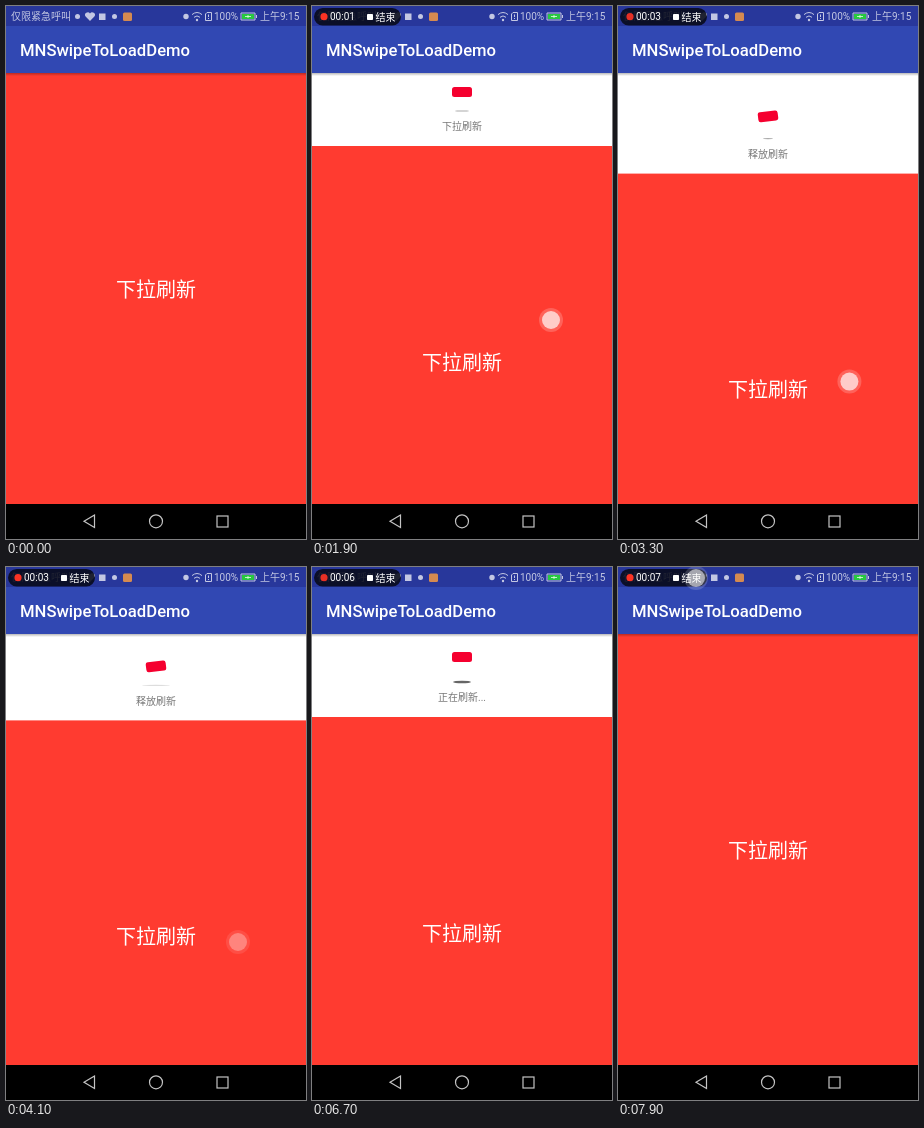
Recreate the animation shown at these times as an HTML page. Size 300 px wide and 533 px high, loop 8 s.

```html
<!DOCTYPE html>
<html lang="zh-CN">
<head>
<meta charset="utf-8">
<style>
  html, body { margin: 0; height: 100%; overflow: hidden; background: #000; }
  svg { display: block; width: 300px; height: 533px; }
  text { font-family: Roboto, "Noto Sans CJK SC", "Noto Sans CJK JP", sans-serif; font-size: 10px; fill: #fff; }
</style>
</head>
<body>
<svg viewBox="0 0 300 533">
  <defs>
    <linearGradient id="fade" x2="0" y2="1">
      <stop stop-opacity=".28"/><stop offset="1" stop-opacity="0"/>
    </linearGradient>
  </defs>
  <rect y="67" width="300" height="431" fill="#fff"/>

  <!-- Everything that slides with the pull; y = 67 is the panel's top edge -->
  <g id="sheet">
    <ellipse id="shadow" cx="150" cy="32"/>
    <rect id="toy" x="-10" y="-5" width="20" height="10" rx="2.5" fill="#f5002f"/>
    <text id="label" x="150" y="51.3" text-anchor="middle" style="fill:#777"></text>
    <rect y="67" width="300" height="431" fill="#ff3b30"/>
    <text x="150" y="290.5" text-anchor="middle" style="font-size:20px;font-weight:300">下拉刷新</text>
  </g>

  <rect y="67" width="300" height="3" fill="url(#fade)"/>
  <rect width="300" height="67" fill="#3148b3"/>
  <rect width="300" height="20" fill="#28379b"/>
  <text x="14" y="50" style="font-size:16.67px;font-weight:500">MNSwipeToLoadDemo</text>

  <g opacity=".72">
    <text x="5" y="14">仅限紧急呼叫</text>
    <text x="208" y="13.6">100%</text>
    <text x="254" y="14">上午9:15</text>
    <g fill="#fff">
      <circle cx="71.5" cy="10.5" r="2.5"/>
      <path d="M84 15L79.6 10.6A2.5 2.5 0 0 1 84 7.4A2.5 2.5 0 0 1 88.4 10.6Z"/>
      <rect x="93" y="7.5" width="6.5" height="6.5"/>
      <circle cx="108.5" cy="10.5" r="2.5"/>
      <circle cx="180" cy="10.5" r="2.7"/>
      <circle cx="191" cy="14" r="1.2"/>
    </g>
    <g fill="none" stroke="#fff">
      <path d="M186 8.6Q191 4.4 196 8.6M188 11.3Q191 8.6 194 11.3"/>
      <path d="M201 6.5H205.5V14.5H199.5V8ZM202.5 8.5V11M202.5 12V13"/>
      <path d="M235 7H249V14H235ZM250.5 9V12"/>
    </g>
  </g>
  <rect x="117" y="6.5" width="9" height="8.5" rx="1.5" fill="#d58a50"/>
  <rect x="236" y="8" width="12" height="5" fill="#27c840"/>
  <path d="M239 10.5H245M242 9V12" stroke="#e8ffe8" stroke-width=".8"/>

  <g id="pill">
    <rect x="2" y="2" width="87" height="17.5" rx="8.75" fill="#080a18" opacity=".87"/>
    <circle id="dot" cx="12" cy="10.7" r="3.6" fill="#ff3425"/>
    <text id="clock" x="18" y="14.3"></text>
    <rect x="55" y="8" width="6" height="6" rx=".8" fill="#fff"/>
    <text x="63.5" y="14.5">结束</text>
  </g>

  <rect y="498" width="300" height="35"/>
  <g fill="none" stroke="#c4c4c4" stroke-width="1.2">
    <path d="M88.5 509V521.5L78 515.2Z"/>
    <circle cx="150" cy="515.3" r="6.5"/>
    <rect x="211" y="510" width="11" height="11"/>
  </g>

  <g id="touch" fill="#fff">
    <circle r="12" opacity=".2"/>
    <circle r="9" opacity=".68"/>
  </g>
</svg>
<script>
const el = id => document.getElementById(id);
const set = (id, attrs) => {
  for (const k in attrs) el(id).setAttribute(k, attrs[k]);
};
const easeOut = u => 1 - (1 - Math.min(1, Math.max(0, u))) ** 3;

// Linear interpolation through [time, ...values] keys
function track(keys, t) {
  const last = keys[keys.length - 1];
  if (t <= keys[0][0]) return keys[0].slice(1);
  if (t >= last[0]) return last.slice(1);
  const i = keys.findIndex(k => k[0] > t), a = keys[i - 1], b = keys[i];
  const u = (t - a[0]) / (b[0] - a[0]);
  return a.slice(1).map((v, j) => v + (b[j + 1] - v) * u);
}

const PULL = [[600, 0], [900, 19], [1000, 23], [1900, 73], [2500, 100], [2800, 101], [4000, 100]];
const FINGER = [[500, 270, 146], [1000, 264, 200], [1900, 239, 314], [2500, 231, 373], [2800, 231, 376], [4000, 232, 375]];
const RELEASE = 4000, REFRESH = 4300, CLOSE = 7200, HEADER = 83;

function offset(t) {
  if (t <= RELEASE) return track(PULL, t)[0];
  if (t <= CLOSE) return HEADER + 17 * (1 - easeOut((t - RELEASE) / 240));
  return HEADER * (1 - easeOut((t - CLOSE) / 450));
}

function draw(t) {
  const d = offset(t);
  const refreshing = t >= REFRESH;
  const armed = !refreshing && t > 1900 && d >= HEADER;
  set("sheet", { transform: `translate(0 ${d.toFixed(1)})` });
  el("label").textContent = refreshing ? "正在刷新..." : armed ? "释放刷新" : "下拉刷新";

  const start = refreshing ? REFRESH : 1900;
  const hop = Math.abs(Math.sin(Math.PI * (Math.min(t, 7100) - start) / 440));
  set("toy", { transform: `translate(150 ${13 - 6 * hop}) rotate(${armed ? -7 : 0})` });
  const settling = t > RELEASE && !refreshing;
  set("shadow", {
    rx: refreshing ? 5 + 4 * hop : settling ? 14 : 7 - 3.5 * hop,
    ry: refreshing ? 1.3 : 0.6,
    fill: refreshing ? "#666" : settling ? "#ddd" : "#aaa"
  });

  set("pill", { opacity: t >= 200 ? 1 : 0 });
  set("dot", { opacity: 0.92 + 0.08 * Math.cos(t * Math.PI / 500) });
  el("clock").textContent = "00:0" + Math.max(0, Math.floor((t - 300) / 1000));

  const tap = t >= 7700;
  const [x, y] = tap ? [78, 11] : track(FINGER, t);
  const shown = tap ? 0.85 : t < 500 ? 0 : Math.max(0, Math.min(1, 1 - (t - RELEASE) / 200));
  set("touch", { transform: `translate(${x} ${y})`, opacity: shown });
}

const begin = performance.now();
function tick() {
  const t = (performance.now() - begin) % 8000;
  draw(Math.floor(t / 100) * 100);
  requestAnimationFrame(tick);
}
tick();
</script>
</body>
</html>
```
